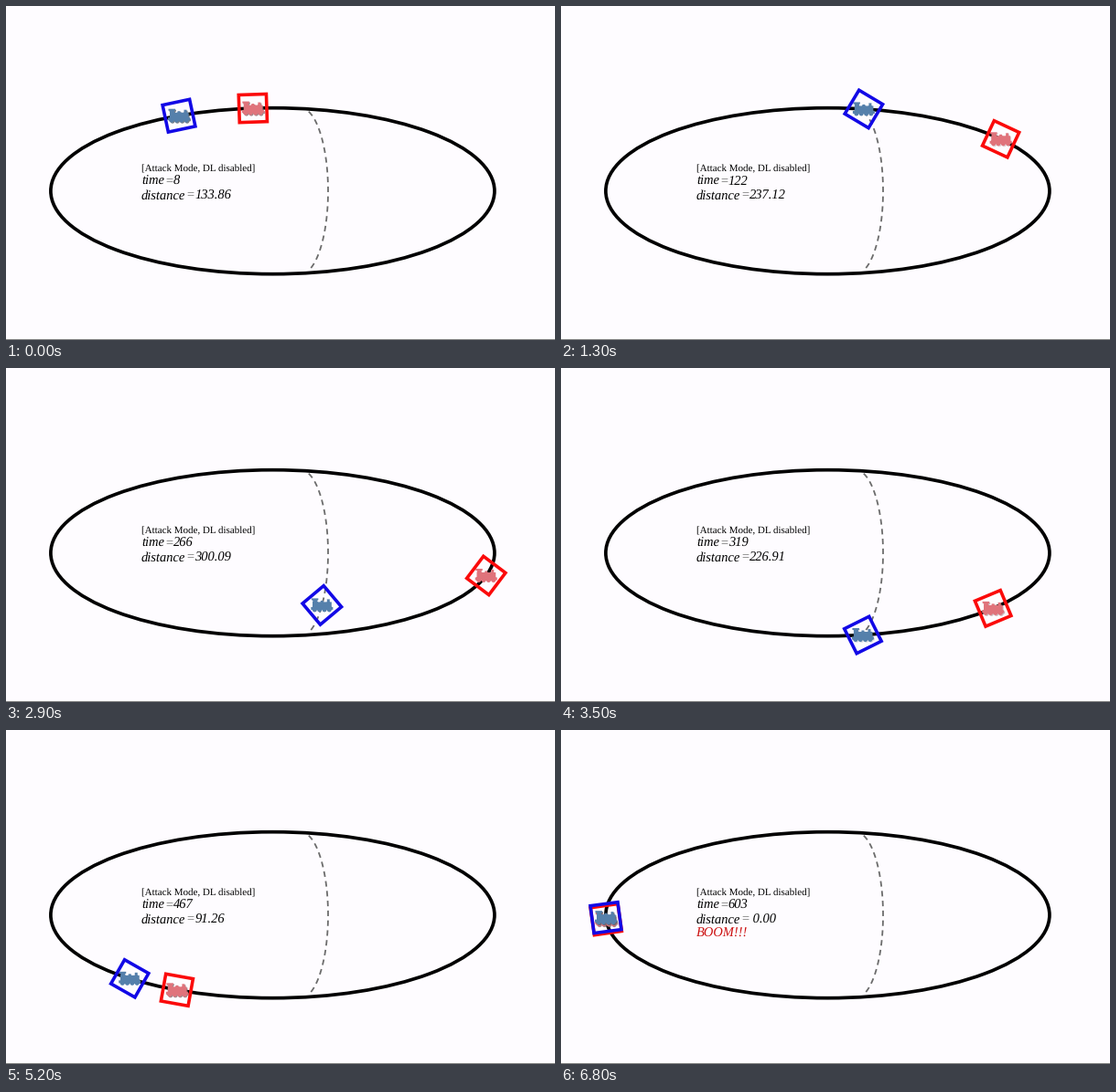
A matplotlib script for the animation above (6900 ms loop, 600 by 366 pixels).

```python
import numpy as np
import matplotlib.pyplot as plt
from matplotlib.animation import FuncAnimation
from matplotlib.patches import Ellipse, PathPatch, Polygon, Rectangle
from matplotlib.path import Path
from matplotlib.transforms import Affine2D

plt.rcParams["text.hinting"] = "none"

W, H, DPI = 600, 366, 100
PX = 72 / DPI
FRAMES, STEP = 69, 100

CX, CY, RX, RY = 291.4, 202.7, 242.5, 91    # main track
SX, SRX = 322, 30                           # shortcut shares CY and RY
JOIN, FORK = .164, .298                     # junction angle on track and shortcut
ENTER, LEAVE = 13.2, 33.8                   # frames blue spends on the shortcut
CRASH = 4.68                                # angle where both trains meet

# frame, clock, distance
READINGS = np.array([(0, 8, 133.86), (7, 69, 174.05), (19, 176, 300.19),
                     (29, 266, 300.09), (42, 380, 141.54), (52, 467, 91.26),
                     (68, 603, 0)]).T


def ease(f, start, end):
    u = np.clip((f - start) / (end - start), 0, 1)
    return u * u * (3 - 2 * u)


def speed_up(u, rate, ramp):
    """Way covered from rest, reaching a steady rate after the ramp."""
    return rate * u * u / (2 * ramp) if u < ramp else rate * (u - ramp / 2)


def on_track(a):
    return CX + RX * np.sin(a), CY - RY * np.cos(a)


def on_cut(a):
    return SX + SRX * np.sin(a), CY - RY * np.cos(a)


def red_pose(f):
    # steady run, held back on the right bend and braking near the end
    brake = .14 * max(0, (f - 50) / 18) ** 3
    a = -.089 + .0757 * f - .26 * ease(f, 18, 29) - brake
    return on_track(a), np.degrees(np.arctan2(RY * np.sin(a), RX * np.cos(a)))


def blue_pose(f):
    if f < ENTER:
        pos = on_track(JOIN - .6 * (1 - f / ENTER) ** 1.72)
    elif f < LEAVE:
        pos = on_cut(FORK + (np.pi - 2 * FORK) * (f - ENTER) / (LEAVE - ENTER))
    else:
        pos = on_track(min(np.pi - JOIN + speed_up(f - LEAVE, .068, 11), CRASH))
    return pos, -12 + 3.3 * f - 40 * ease(f, 14, 34)


fig = plt.figure(figsize=(W / DPI, H / DPI), dpi=DPI, facecolor="#fefcff")
ax = fig.add_axes([0, 0, 1, 1])
ax.set(xlim=(0, W), ylim=(H, 0))
ax.axis("off")

ax.add_patch(Rectangle((0, H - 1), W, 1, fc="#858585", ec="none"))
cut = np.linspace(FORK, np.pi - FORK, 120)
ax.plot(*on_cut(cut), color="#6c6c6c", lw=1.8 * PX, dashes=(3.4, 2.6),
        dash_capstyle="butt", zorder=1)
ax.add_patch(Ellipse((CX, CY), 2 * RX, 2 * RY, fill=False, ec="black",
                     lw=3.7 * PX, zorder=2))


def block(x0, y0, x1, y1):
    return Path([(x0, y0), (x1, y0), (x1, y1), (x0, y1), (x0, y0)], closed=True)


def loco():
    roof, cab = block(-11.5, -7.5, -4, -5.5), block(-10, -6, -5, 4)
    boiler, chimney = block(-10, -3.5, 10.5, 4), block(5.5, -6.5, 8.5, -3)
    dome, base = block(-1.5, -5, 1.5, -3), block(-12, 2, 12, 5)
    wheels = [Path.circle((x, 5), 2.5) for x in (-8, -2.7, 2.7, 8)]
    return Path.make_compound_path(roof, cab, boiler, chimney, dome, base, *wheels)


class Train:
    square = np.array([(-1, -1), (1, -1), (1, 1), (-1, 1)]) * 15.1

    def __init__(self, frame_color, color, edge, z):
        self.ghost = PathPatch(loco(), fc=edge, ec="none", zorder=z)
        self.shape = PathPatch(loco(), fc=color, ec="none", zorder=z + .1)
        self.box = Polygon(self.square, fill=False, ec=frame_color, lw=3.6 * PX,
                           joinstyle="miter", zorder=z + .2)
        for p in (self.ghost, self.shape, self.box):
            ax.add_patch(p)

    def place(self, pos, turn):
        c, s = np.cos(np.radians(turn)), np.sin(np.radians(turn))
        self.box.set_xy(self.square @ np.array([(c, s), (-s, c)]) + pos)
        x, y = pos
        self.shape.set_transform(Affine2D().translate(x, y) + ax.transData)
        self.ghost.set_transform(Affine2D().translate(x + 1, y + 1) + ax.transData)
        # the shadow fades as the frame tilts
        tilt = abs((turn + 45) % 90 - 45)
        self.ghost.set_alpha(float(np.clip((29 - tilt) / 14, 0, .8)))


red = Train("#fb0a0a", "#e0737b", "#8f6a6e", 4)
blue = Train("#1208e6", "#5580ab", "#56616c", 6)

X0, BIG = 148, 14.5


def label(x, y, text, size=BIG, style="italic", color="black"):
    return ax.text(x, y, text, fontfamily="Liberation Serif", fontsize=size * PX,
                   fontstyle=style, color=color, va="baseline", zorder=3)


def row(y, name, em):
    """Name, grey equals sign and an empty value; em is the name's advance."""
    label(X0, y, name)
    label(X0 + em * BIG, y, "=", color="#777777")
    return label(X0 + (em + .675) * BIG, y, "")


label(X0, 181, "[Attack Mode, DL disabled]", 11, "normal")
time_text = row(196, "time", 1.722)
dist_text = row(211.5, "distance", 3.333)
boom = label(X0, 227, "BOOM!!!", color="#cc1010")


def draw(f):
    red.place(*red_pose(f))
    blue.place(*blue_pose(f))
    frames, clock, gaps = READINGS
    gap = np.interp(f, frames, gaps)
    time_text.set_text(f"{np.interp(f, frames, clock):.0f}")
    dist_text.set_text(f"{gap:5.2f}")
    boom.set_visible(bool(gap < .005))
    return []


anim = FuncAnimation(fig, draw, frames=FRAMES, interval=STEP, repeat=True,
                     repeat_delay=0, blit=False)
plt.show()
```
